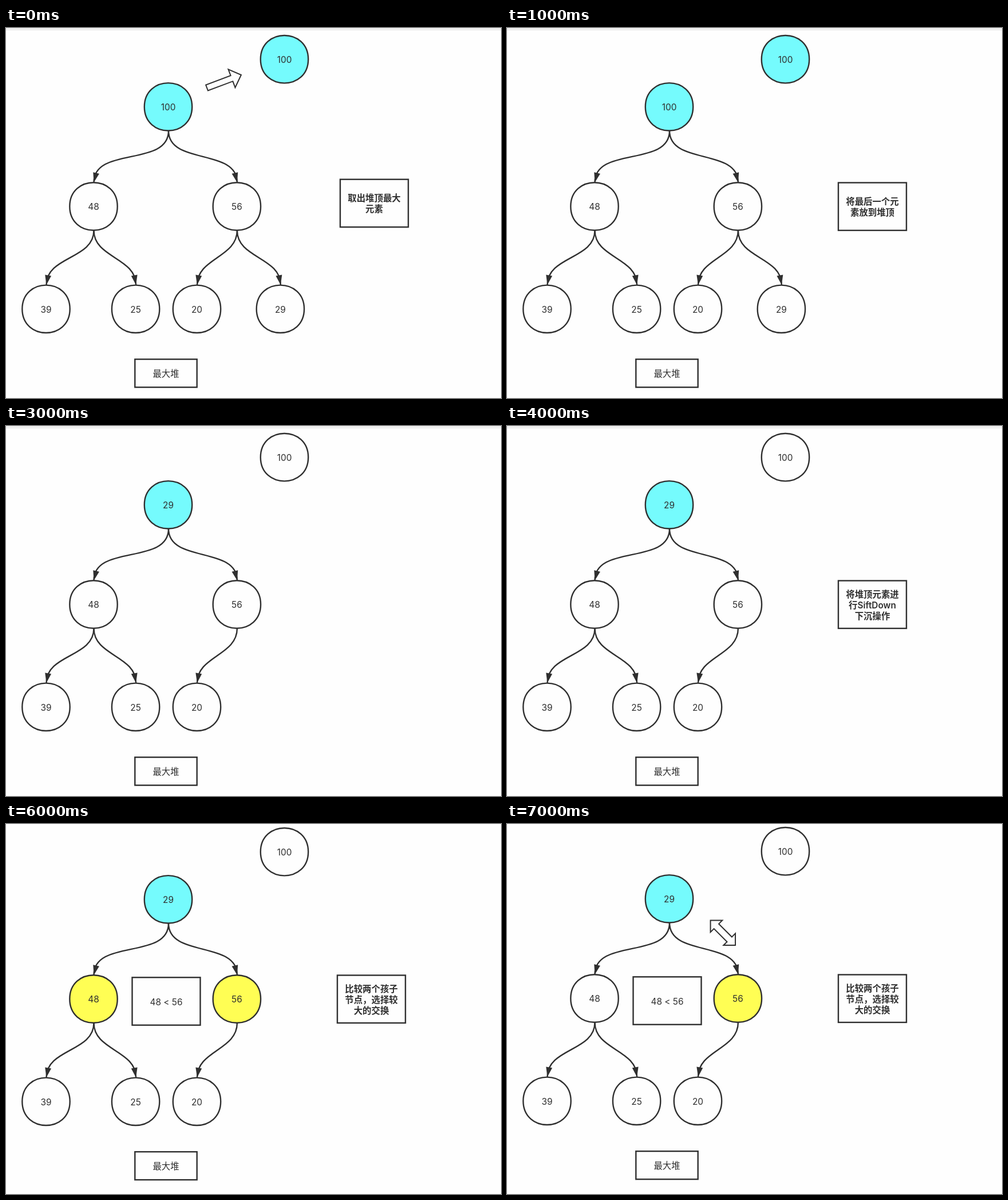
Animation of 865 by 647 pixels, one loop 8000 ms. Source, as an HTML page with a canvas:

```html
<!DOCTYPE html>
<html lang="zh-CN">
<head>
<meta charset="utf-8">
<title>Heap: extract max</title>
<style>
html, body { margin: 0; width: 100%; height: 100%; overflow: hidden; background: #fefefe; }
canvas { display: block; }
</style>
</head>
<body>
<canvas id="stage" width="865" height="647"></canvas>
<script>
const ctx = document.getElementById('stage').getContext('2d');
const INK = '#2f2f2f', WHITE = '#fefefe', CYAN = '#75fbfd', YELLOW = '#fffe54';
const FONT = '15.4px Inter, "Noto Sans CJK SC", "Noto Sans CJK", sans-serif';
const STEP = 1000;

const spots = {
  out: [486.5, 54.7], root: [283.5, 137.8],
  left: [153, 312], right: [403.4, 312],
  a: [70, 491.3], b: [226.6, 491.3], c: [333.5, 491.3], d: [479.4, 491.3]
};
const links = [
  ['root', 'left'], ['root', 'right'], ['left', 'a'],
  ['left', 'b'], ['right', 'c'], ['right', 'd']
];
const values = { out: 100, left: 48, right: 56, a: 39, b: 25, c: 20 };

const takeOut = { x: 584, y: 264.7, lines: ['取出堆顶最大', '元素'] };
const moveLast = { x: 579, y: 270.5, lines: ['将最后一个元', '素放到堆顶'] };
const siftDown = { x: 579, y: 270.5, lines: ['将堆顶元素进', '行SiftDown', '下沉操作'] };
const pickChild = { x: 579, y: 270.5, lines: ['比较两个孩子', '节点，选择较', '大的交换'] };

const full = { root: 100, d: 29 };
const shrunk = { root: 29 };
const steps = [
  { extra: full, fill: { out: CYAN, root: CYAN }, note: takeOut, pull: true },
  { extra: full, fill: { out: CYAN, root: CYAN }, note: moveLast },
  { extra: shrunk, fill: { out: CYAN } },
  { extra: shrunk, fill: { root: CYAN } },
  { extra: shrunk, fill: { root: CYAN }, note: siftDown },
  { extra: shrunk, fill: { root: CYAN }, note: pickChild, dy: -6 },
  { extra: shrunk, fill: { root: CYAN, left: YELLOW, right: YELLOW }, note: pickChild, compare: true, dy: -6 },
  { extra: shrunk, fill: { root: CYAN, right: YELLOW }, note: pickChild, compare: true, swap: true, dy: -7 }
];

function text(str, x, y, weight = 400) {
  ctx.font = weight + ' ' + FONT;
  ctx.fillStyle = INK;
  ctx.fillText(str, x, y + 5.7);
}

// Rounded node made of two cubic arcs, slightly squarer than a circle.
function node([x, y], label, fill = WHITE) {
  const r = 41.7, k = r * 4 / 3;
  ctx.beginPath();
  ctx.moveTo(x - r, y);
  ctx.bezierCurveTo(x - r, y - k, x + r, y - k, x + r, y);
  ctx.bezierCurveTo(x + r, y + k, x - r, y + k, x - r, y);
  ctx.closePath();
  ctx.fillStyle = fill;
  ctx.fill();
  ctx.stroke();
  text(label, x, y + 0.5);
}

function link([px, py], [cx, cy]) {
  const x0 = px + 0.5, y0 = py + 42, x1 = cx + 0.5, y1 = cy - 42;
  const reach = 0.4 * Math.hypot(x1 - x0, y1 - y0);
  ctx.beginPath();
  ctx.moveTo(x0, y0);
  ctx.bezierCurveTo(x0, y0 + reach, x1, y1 - reach, x1, y1);
  ctx.stroke();

  const t = 0.89, s = 1 - t;
  const near = s * s * s + 3 * s * s * t;
  const bx = x0 * near + x1 * (1 - near);
  const by = y0 * near + y1 * (1 - near) + 3 * s * t * reach * (s - t);
  ctx.save();
  ctx.translate(x1, y1);
  ctx.rotate(Math.atan2(y1 - by, x1 - bx));
  ctx.beginPath();
  ctx.moveTo(0, 0);
  ctx.lineTo(-17, -5.5);
  ctx.lineTo(-17, 5.5);
  ctx.closePath();
  ctx.fillStyle = INK;
  ctx.fill();
  ctx.restore();
}

function box(x, y, w, h, lines, weight) {
  ctx.fillStyle = WHITE;
  ctx.fillRect(x, y, w, h);
  ctx.strokeRect(x, y, w, h);
  lines.forEach((line, i) => {
    text(line, x + w / 2, y + h / 2 + 0.8 + 19 * (i - (lines.length - 1) / 2), weight);
  });
}

// Hollow arrow centred on x, y; with two heads when `both` is set.
function arrow(x, y, angle, length, head, wide, body, both) {
  const end = length / 2, neck = end - head;
  const side = [[neck, body], [neck, wide], [end, 0], [neck, -wide], [neck, -body]];
  const tail = both ? side.map(([u, v]) => [-u, -v]) : [[-end, -body], [-end, body]];
  ctx.save();
  ctx.translate(x, y);
  ctx.rotate(angle);
  ctx.lineWidth = 2;
  ctx.beginPath();
  side.concat(tail).forEach(([u, v]) => ctx.lineTo(u, v));
  ctx.closePath();
  ctx.fillStyle = WHITE;
  ctx.fill();
  ctx.stroke();
  ctx.restore();
}

function draw(step) {
  const dy = step.dy || 0;
  const labels = { ...values, ...step.extra };
  ctx.fillStyle = WHITE;
  ctx.fillRect(0, 0, 865, 647);
  if (!dy) {
    ctx.fillStyle = '#f1f1f1';
    ctx.fillRect(0, 0, 865, 4.5);
  }
  ctx.save();
  ctx.translate(0, dy);
  ctx.strokeStyle = INK;
  ctx.lineWidth = 2.4;
  ctx.textAlign = 'center';
  for (const [from, to] of links) {
    if (to in labels) link(spots[from], spots[to]);
  }
  for (const key in labels) node(spots[key], labels[key], step.fill[key]);
  box(225.3, 579.2, 108.4, 49, ['最大堆']);
  if (step.note) box(step.note.x, step.note.y, 119, 83.4, step.note.lines, 600);
  if (step.compare) box(220.5, 274.3, 119, 83.4, ['48 < 56']);
  if (step.pull) arrow(381, 93.3, -0.36, 64, 17.6, 17, 5.3);
  if (step.swap) arrow(377.3, 197.3, Math.PI / 4, 61.5, 14.6, 14.6, 6, true);
  ctx.restore();
}

function tick() {
  draw(steps[Math.floor(performance.now() / STEP) % steps.length]);
  requestAnimationFrame(tick);
}
tick();
</script>
</body>
</html>
```
